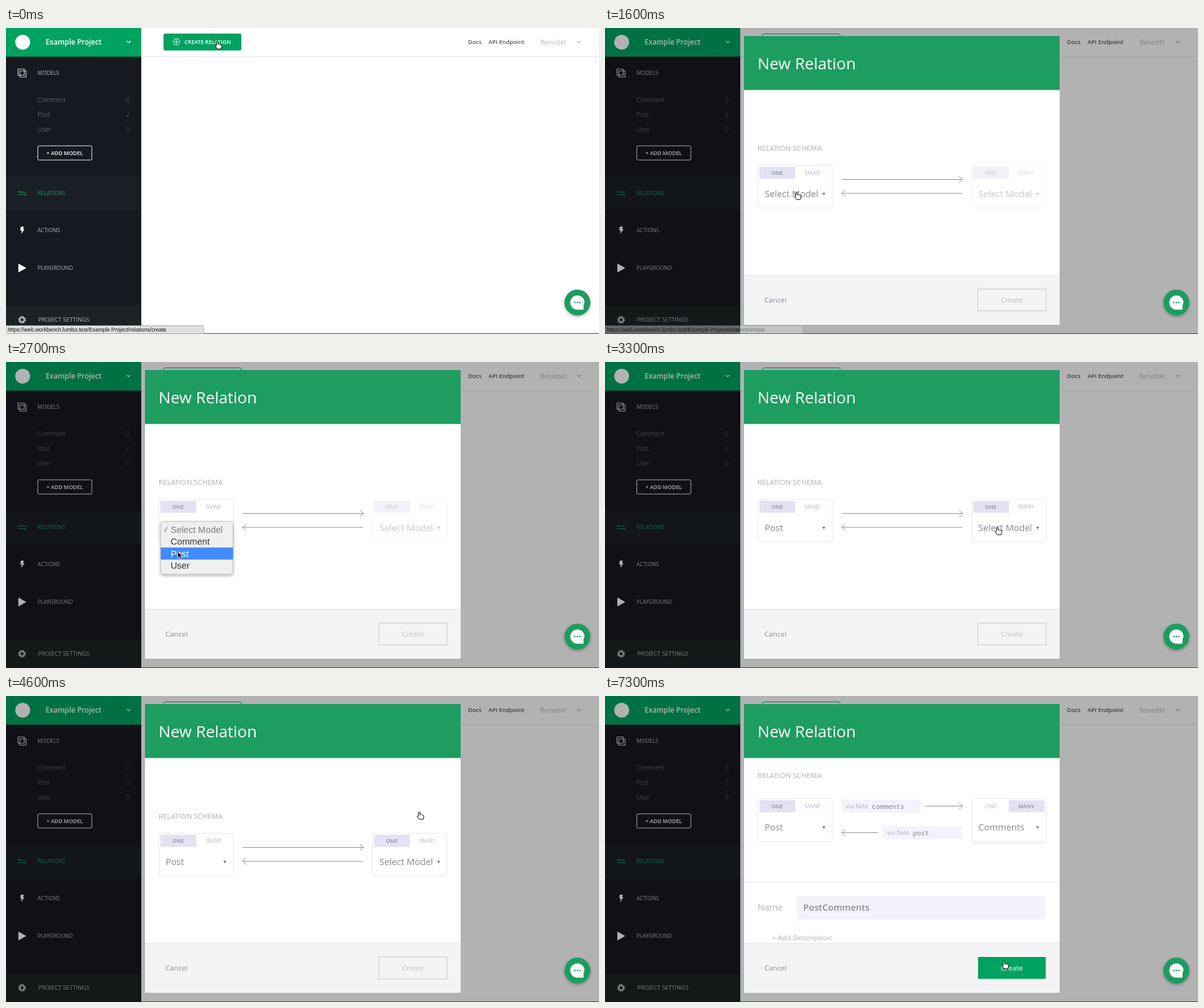
These frames come from a looping animation (960 by 496 pixels, 7400 ms). An HTML page:

```html
<!DOCTYPE html>
<html lang="en">
<head>
<meta charset="utf-8">
<title>New Relation</title>
<style>
  html, body { margin: 0; width: 100%; height: 100%; overflow: hidden; background: #fff; }
  svg { display: block; width: 960px; height: 496px; font-family: "Open Sans", sans-serif; }
  text { white-space: pre; }
</style>
</head>
<body>
<svg id="stage" viewBox="0 0 960 496"></svg>
<script>
const LOOP = 7400, STEP = 100;
const GREEN = '#00a260', MODAL_GREEN = '#1e9d60', LILAC = '#e3e2f2', PALE = '#f3f3fd';
const SANS = "'Liberation Sans', Arial, sans-serif";
const MONO = "'Noto Sans Mono', monospace";

// Moments at which the interface changes
const at = {
  modal: 1200, openLeft: 2000, pickLeft: 2900, openRight: 3500, pickRight: 4000,
  details: 4700, many: 5000, focus: 5900, type: 6300, blur: 7200
};

// Pointer stops: time, x, y, shape used from then on
const stops = [
  [0, 342, 22, 'hand'], [1100, 342, 22, 'hand'], [1500, 310, 266, 'hand'],
  [2000, 310, 266, 'arrow'], [2500, 280, 303, 'arrow'], [2700, 278, 307, 'arrow'],
  [2900, 278, 308, 'arrow'], [3300, 635, 268, 'hand'], [3500, 635, 268, 'arrow'],
  [3800, 619, 299, 'arrow'], [4000, 620, 293, 'arrow'], [4200, 624, 286, 'hand'],
  [4600, 669, 188, 'hand'], [4800, 680, 179, 'hand'], [5200, 680, 179, 'arrow'],
  [5800, 448, 331, 'beam'], [6800, 448, 331, 'arrow'], [7200, 646, 430, 'hand'], [LOOP, 646, 430, 'hand']
];

const pointers = {
  hand: '<path d="M-1.2 .5Q0-1.2 1.2.5V4.2Q2.5 3.4 3.4 4.6 4.8 4 5.5 5.2 7 4.8 7.2 6.2V9L6 12H.2L-3.4 7.4Q-3.4 5.8-1.2 7z" fill="#fff" stroke="#000"/>',
  arrow: '<path d="M0 0V11L2.6 8.7 4.4 12.6 6.2 11.8 4.5 8H8z" stroke="#fff" stroke-width=".8"/>',
  beam: '<path d="M-2.5-6Q0-6 0-4.5Q0-6 2.5-6M0-5V5M-2.5 6Q0 6 0 4.5Q0 6 2.5 6M-1.5 1H1.5" fill="none" stroke="#222"/>'
};

const rect = (x, y, w, h, fill, more = '') =>
  `<rect x="${x}" y="${y}" width="${w}" height="${h}" fill="${fill}" ${more}/>`;

const line = (d, stroke, width = 1) =>
  `<path d="${d}" fill="none" stroke="${stroke}" stroke-width="${width}"/>`;

// Text placed by the middle of its capitals
const text = (x, middle, size, fill, string, { weight = 400, anchor = 'start', font = '' } = {}) =>
  `<text x="${x}" y="${middle + size * .36}" font-size="${size}" fill="${fill}" font-weight="${weight}"
    text-anchor="${anchor}" ${font && `font-family="${font}"`}>${string}</text>`;

const SEMI = { weight: 600 }, LIGHT = { weight: 300 };
const chevron = (x, y, color) => line(`M${x - 3} ${y - 1.5}l3 3 3-3`, color, 1.2);

function sidebar() {
  const models = [['Comment', 0], ['Post', 2], ['User', 0]].map(([name, count], i) =>
    text(51, 116.5 + 24 * i, 10.22, '#85888c', name, LIGHT) +
    text(200, 116.5 + 24 * i, 10.22, '#66696d', count, { weight: 300, anchor: 'end' })).join('');
  return rect(0, 0, 219, 496, '#161920') + rect(0, 241, 219, 54, '#1a1e25') + rect(0, 450, 219, 46, '#1b2224') +
    rect(0, 0, 219, 46.5, GREEN) +
    '<circle cx="27" cy="23" r="12" fill="#fff"/>' +
    text(64, 23, 11.68, '#fff', 'Example Project', SEMI) + chevron(198.5, 22.5, '#fff') +
    line('M19.5 66.5h10v10h-10zM22.5 69.5h10v10h-10z', '#d0d1d2', 1.2) +
    text(51, 73, 8.76, '#b4b6b8', 'MODELS') + models +
    rect(51.5, 191, 87.5, 23, 'none', 'rx="2" stroke="#f0f0f0"') +
    text(95, 202.5, 8.76, '#fff', '+ ADD MODEL', { weight: 600, anchor: 'middle' }) +
    line('M33 266H19.5l3-2.5M19.5 270H33l-3 2.5', MODAL_GREEN) +
    text(51, 268, 8.76, MODAL_GREEN, 'RELATIONS') +
    '<path d="M24 322h5l-1.5 4H30l-5.5 8 1-6H23z" fill="#fff"/>' +
    text(51, 328, 8.76, '#b4b6b8', 'ACTIONS') +
    '<path d="M20.5 382.5L32 389 20.5 395.5z" fill="#fff" stroke="#fff" stroke-linejoin="round"/>' +
    text(51, 389, 8.76, '#b4b6b8', 'PLAYGROUND') +
    `<g fill="none" stroke="#b4b6b8"><circle cx="26" cy="473" r="3.7" stroke-width="2.6"/>
      <circle cx="26" cy="473" r="5.5" stroke-width="1.8" stroke-dasharray="2.2 2.12"/></g>` +
    text(52, 473, 9.45, '#b4b6b8', 'PROJECT SETTINGS');
}

function topBar(hovered) {
  const ink = hovered ? '#fff' : GREEN;
  return rect(219, 46, 741, 1, '#e6e6e6') +
    rect(255.5, 9.5, 125, 26.5, hovered ? GREEN : '#fff', `rx="2" stroke="${GREEN}"`) +
    `<circle cx="276" cy="22.5" r="5.2" fill="none" stroke="${ink}"/>` +
    line('M273 22.5h6M276 19.5v6', ink) +
    text(289, 23, 8.76, ink, 'CREATE RELATION', SEMI) +
    text(748, 23, 9.4, '#555', 'Docs', SEMI) + text(781, 23, 9.4, '#555', 'API Endpoint', SEMI) +
    text(865, 23, 10.22, '#b8b8b8', 'Benedikt') + chevron(927.5, 22.5, '#aaa');
}

function card(x, y, label, many, opacity = 1) {
  const tab = (dx, name, on) =>
    (on ? rect(x + dx, y + 3, 58, 19.5, LILAC) : '') +
    text(x + dx + 28.5, y + 13, 8.76, on ? '#8d8da6' : '#b5b5d2', name, { weight: on ? 600 : 400, anchor: 'middle' });
  const box = (dx, dy, w) => rect(x + dx + .5, y + .5 + dy, w, 69, '#fff', 'rx="2" stroke="#e7e7f0"');
  return `<g opacity="${opacity}">` + (many ? box(2, 4, 117) + box(1, 2, 119) : '') + box(0, 0, 120.5) +
    tab(3, 'ONE', !many) + tab(60.5, 'MANY', many) +
    text(x + 11.5, y + 46.5, 14.6, '#88888f', label) +
    `<path d="M${x + 105} ${y + 45}h4.6l-2.3 4.4z" fill="#77777f"/></g>`;
}

function arrow(from, to, y) {
  const back = Math.sign(from - to) * 6;
  return line(`M${from} ${y}H${to}m${back}-5.5L${to} ${y}l${back} 5.5`, '#8f8f98');
}

const field = (x, y, name) => rect(x, y, 128.5, 21, PALE) +
  text(x + 7, y + 11, 9.49, '#bcbccc', 'via field', SEMI) +
  text(x + 49, y + 11, 10.9, '#85858f', name, { font: MONO });

function dropdown(x, pointerY) {
  const top = 261.5, pitch = 19.6;
  const active = Math.floor((pointerY - top) / pitch);
  const rows = ['Select Model', 'Comment', 'Post', 'User'].map((name, i) => {
    const y = top + pitch * i, lit = i > 0 && i === active;
    return (lit ? rect(x, y, 117, pitch, '#418aff') : '') +
      text(x + 16, y + 9.8, 14.6, lit ? '#fff' : i ? '#333' : '#7c7c7c', name, { font: SANS });
  }).join('');
  return rect(x, 258.5, 117, 85.5, '#efefef', 'rx="4" stroke="#b9b9b9" stroke-width=".8" filter="url(#soft)"') + rows +
    line(`M${x + 5.5} 271.5l2 3 3.5-7`, '#8c8c8c', 1.2);
}

function details(t, typed) {
  const many = t >= at.many;
  const caretX = typed ? 321 + 8.9 * typed.length : 321;
  return text(247, 129, 11.68, '#b0b0b4', 'RELATION SCHEMA') +
    card(247, 166, 'Post', false) + card(593, 166, many ? 'Comments' : 'Comment', many) +
    field(383, 168, many ? 'comments' : 'comment') + arrow(518, 579, 178.5) +
    field(449.5, 211, 'post') + arrow(442, 383, 221.5) +
    rect(225, 301, 511, 1, '#e6e6e6') +
    text(247, 343, 14.6, '#b3b3b6', 'Name') + rect(310, 324, 404, 38, PALE) +
    text(321, 343, 14.6, typed ? '#8b8b96' : '#bfbfc9', typed || '+ Add Relation Name', SEMI) +
    (t >= at.focus && t < at.blur ? rect(caretX, 335, 1, 16, '#666') : '') +
    text(270, 391.5, 11.68, '#b3b3b6', '+ Add Description');
}

function schema(t) {
  return text(247, 194.5, 11.68, '#b0b0b4', 'RELATION SCHEMA') +
    card(247, 222, t < at.pickLeft ? 'Select Model' : 'Post', false) +
    card(593, 222, 'Select Model', false, t < at.pickLeft ? .45 : 1) +
    arrow(383, 579, 245.5) + arrow(578.5, 383, 268);
}

function modal(t, pointerY) {
  const typed = 'PostComments'.slice(0, Math.max(0, (t - at.type) / 50));
  const create = typed
    ? rect(604, 423, 109.5, 35.5, GREEN)
    : rect(603.5, 423, 110.5, 35.5, 'none', 'stroke="#c6c6ce"');
  return rect(0, 0, 960, 496, '#000', 'opacity=".3"') +
    rect(225, 13, 511, 468, '#fff') + rect(225, 13, 511, 87.5, MODAL_GREEN) +
    text(247, 57.5, 25.9, '#fff', 'New Relation') +
    (t < at.details ? schema(t) : details(t, typed)) +
    rect(225, 400.5, 511, 80.5, '#f4f4f4') + rect(225, 400.5, 511, 1, '#e4e4e6') +
    text(258, 440.5, 11.68, '#8c8c9a', 'Cancel') + create +
    text(658.7, 441, 11.68, typed ? '#fff' : '#bfbfc8', 'Create', { anchor: 'middle' }) +
    (t >= at.openLeft && t < at.pickLeft ? dropdown(250.5, pointerY) : '') +
    (t >= at.openRight && t < at.pickRight ? dropdown(596.5, pointerY) : '');
}

const chat = () =>
  `<circle cx="925" cy="445" r="21" fill="${MODAL_GREEN}" filter="url(#soft)"/>
   <path d="M935 449V456.5H925A11.5 11.5 0 1 1 936.5 445z" fill="#fff"/>` +
  [-4, 0, 4].map(dx => `<circle cx="${925 + dx}" cy="445" r="1.3" fill="${MODAL_GREEN}"/>`).join('');

function statusBar(t) {
  const opacity = t < 1500 ? 1 : t < 1600 ? .7 : t < 1700 ? .4 : 0;
  return `<g opacity="${opacity}"><path d="M0 482.5H317.5Q320 482.5 320 485V495.5H0z" fill="#e0e0e0" stroke="#aaa"/>` +
    text(3, 489, 8.7, '#111', 'https://web.workbench.lumbo.test/Example Project/relations/create', { font: SANS }) + '</g>';
}

function pointerAt(t) {
  const next = stops.findIndex(stop => stop[0] > t);
  const [t0, x0, y0, shape] = stops[next - 1], [t1, x1, y1] = stops[next];
  const p = (t - t0) / (t1 - t0), ease = p * p * (3 - 2 * p);
  return { x: x0 + (x1 - x0) * ease, y: y0 + (y1 - y0) * ease, shape };
}

function scene(t) {
  const { x, y, shape } = pointerAt(t), open = t >= at.modal;
  return `<defs><filter id="soft" x="-30%" y="-30%" width="160%" height="170%">
      <feDropShadow dx="0" dy="2" stdDeviation="2.5" flood-opacity=".3"/></filter></defs>` +
    rect(0, 0, 960, 496, '#fff') + topBar(!open) + sidebar() +
    (open ? modal(t, y) : '') + chat() + rect(219, 495, 741, 1, '#444') + statusBar(t) +
    `<g transform="translate(${x} ${y})">${pointers[shape]}</g>`;
}

const stage = document.getElementById('stage');
const start = performance.now();
let shown = -1;

function play() {
  const t = Math.floor((performance.now() - start) % LOOP / STEP) * STEP;
  if (t !== shown) stage.innerHTML = scene(shown = t);
  requestAnimationFrame(play);
}
play();
</script>
</body>
</html>
```
